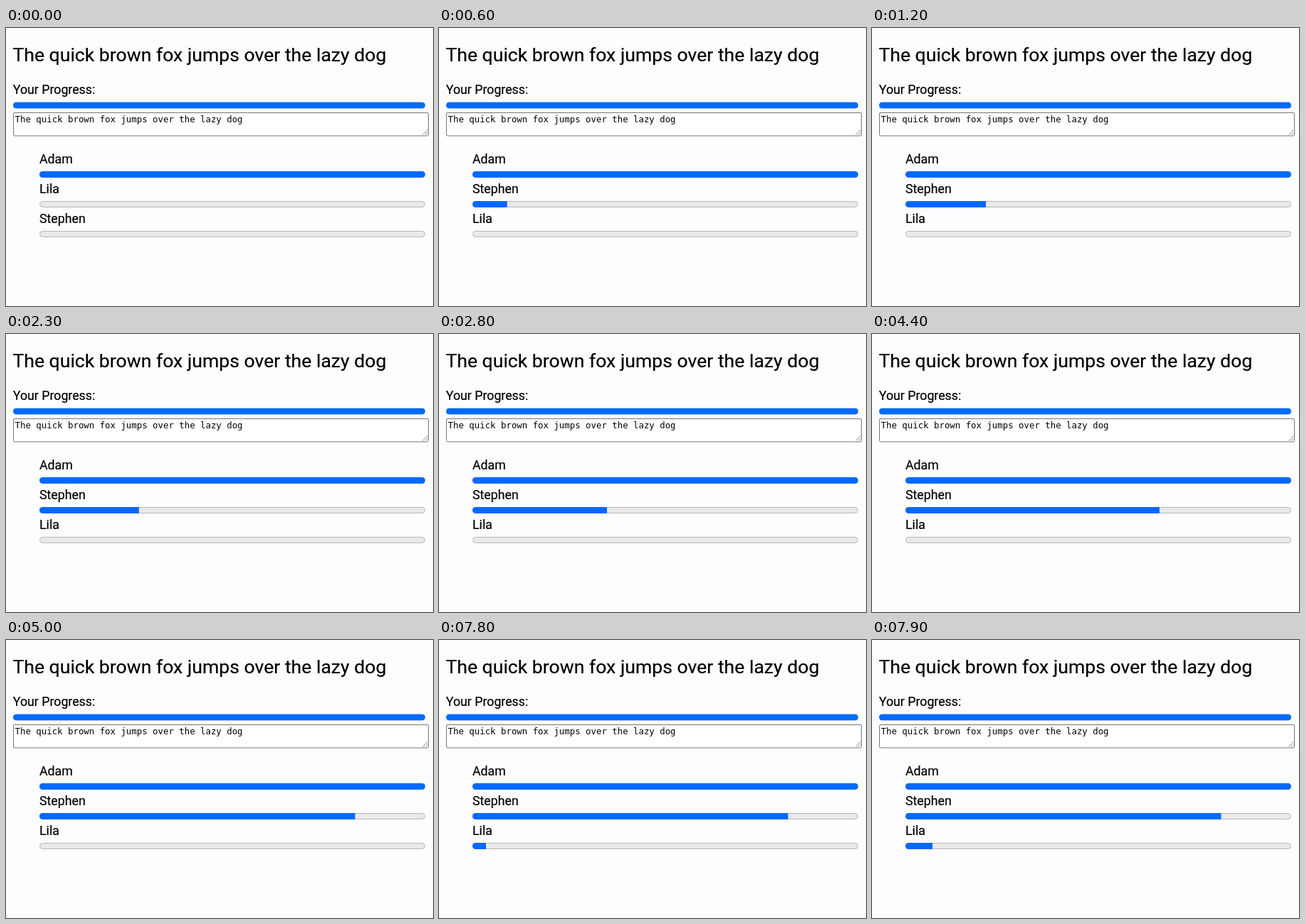
These frames come from a looping animation (600x392 px, 8000 ms). An HTML page:

```html
<!DOCTYPE html>
<html lang="en">
<head>
<meta charset="utf-8">
<title>Typing race</title>
<style>
  html, body { margin: 0; width: 100%; height: 100%; overflow: hidden; background: #fdfcff; }
  svg { display: block; width: 600px; height: 392px; }
  text { font: 17.75px Roboto, Arial, sans-serif; fill: #000; stroke: #000; stroke-width: .2px; white-space: pre; }
  .title { font-size: 26.6px; }
  .typed { font: 12.36px "DejaVu Sans Mono", monospace; stroke: none; }
  .track { fill: #e9e9eb; stroke: #b8b8ba; stroke-width: 1; }
  .fill { fill: #0069ff; }
  .box { fill: #fff; stroke: #767676; stroke-width: 1; }
  .grip { fill: none; stroke: #808080; stroke-width: .9; }
</style>
</head>
<body>
<svg id="stage" viewBox="0 0 600 392">
  <text class="title" x="9.4" y="47.3">The quick brown fox jumps over the lazy dog</text>
  <text x="9.8" y="93.4">Your Progress:</text>
  <rect class="box" x="10.5" y="119.5" width="583" height="32.5" rx="1.5"/>
  <path class="grip" d="M585.5 150.5l7-7M589.5 150.5l3-3"/>
  <text class="typed" x="12.6" y="133">The quick brown fox jumps over the lazy dog</text>
</svg>
<script>
const LOOP = 8000, STEP = 100, LEFT = 47, RIGHT = 589;
const stage = document.getElementById('stage');

function add(parent, tag, attrs) {
  const el = document.createElementNS('http://www.w3.org/2000/svg', tag);
  for (const key in attrs) el.setAttribute(key, attrs[key]);
  return parent.appendChild(el);
}

let clips = 0;
function bar(parent, x, y, width) {
  const id = 'pill' + clips++;
  const clip = add(parent, 'clipPath', { id });
  add(clip, 'rect', { x, y, width: RIGHT - x, height: 9, rx: 4.5 });
  add(parent, 'rect', { class: 'track', x: x + .5, y: y + .5, width: RIGHT - x - 1, height: 8, rx: 4 });
  return add(parent, 'rect', { class: 'fill', x, y, width, height: 9, 'clip-path': `url(#${id})` });
}

function racer(name, width) {
  const row = add(stage, 'g', {});
  add(row, 'text', { x: LEFT, y: 191 }).textContent = name;
  return { row, fill: bar(row, LEFT, 202, width) };
}

const place = (r, rank) => r.row.setAttribute('transform', `translate(0 ${rank * 42})`);

bar(stage, 10, 104.5, RIGHT - 10);
const first = racer('Adam', RIGHT - LEFT);
const typist = racer('Stephen', 0);
const late = racer('Lila', 0);
place(first, 0);

// Bursts of typing: first step, last step, end of the bar afterwards
const typistRuns = [
  [100, 400, 85], [600, 1200, 160], [1600, 1700, 167], [1900, 2100, 177],
  [2300, 2800, 236], [2900, 3100, 273], [3300, 3500, 312], [3700, 3900, 351],
  [4100, 4400, 404], [4500, 4900, 480], [5000, 5000, 490.5]
];
const lateRuns = [[7800, 7900, 85]];

function edge(runs, t) {
  let x = LEFT;
  for (const [from, to, end] of runs) {
    if (t < from) break;
    const part = Math.min(1, (t - from + STEP) / (to - from + STEP));
    x += (end - x) * part;
  }
  return x;
}

function draw(now) {
  const t = Math.floor((now % LOOP) / STEP) * STEP;
  const x = edge(typistRuns, t);
  const ahead = x > LEFT;
  typist.fill.setAttribute('width', x - LEFT);
  late.fill.setAttribute('width', edge(lateRuns, t) - LEFT);
  place(typist, ahead ? 1 : 2);
  place(late, ahead ? 2 : 1);
}

let start;
function frame(now) {
  start ??= now;
  draw(now - start);
  requestAnimationFrame(frame);
}
draw(0);
requestAnimationFrame(frame);
</script>
</body>
</html>
```
